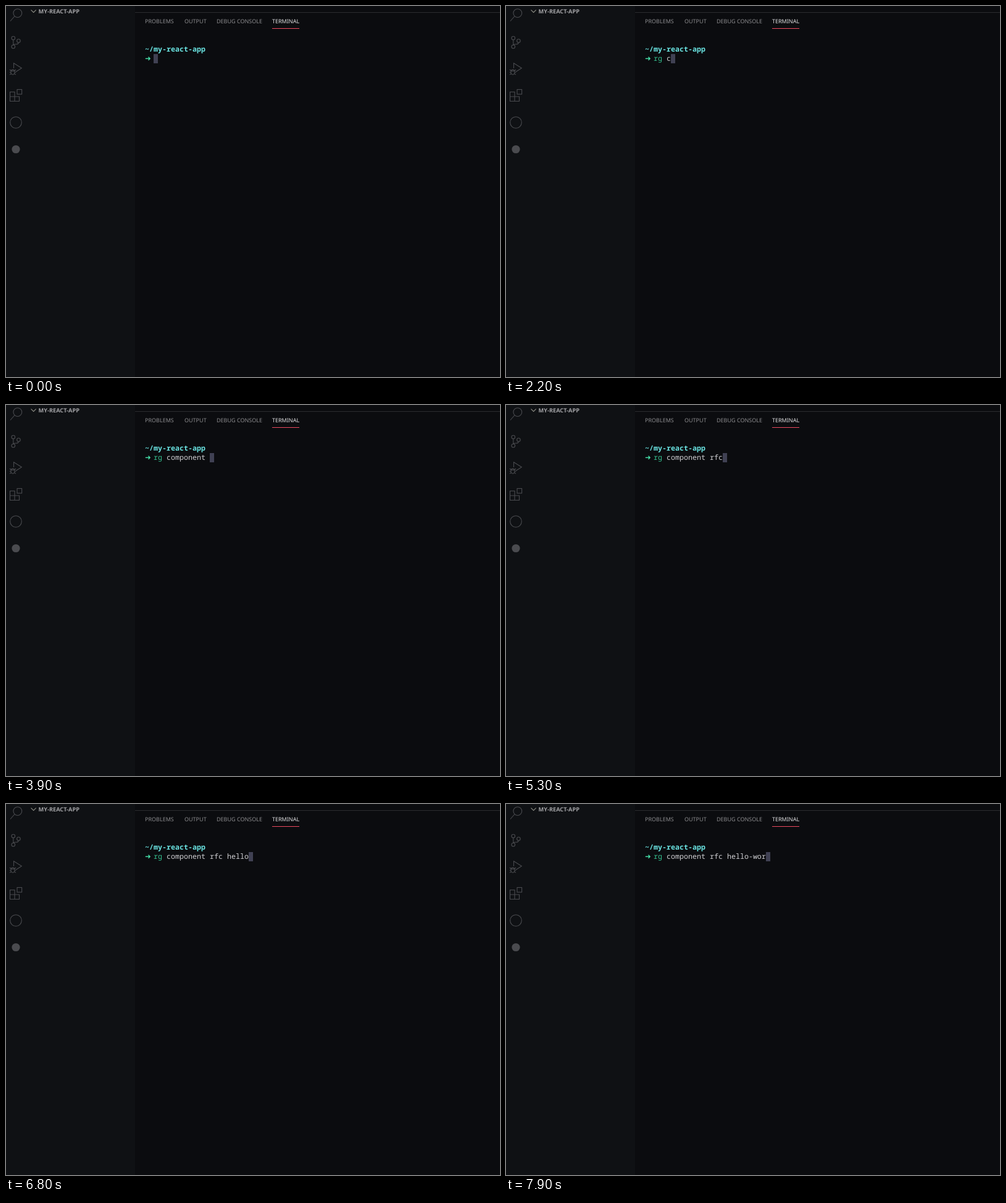
An HTML page for the animation above (8000 ms loop, 800x602 px).

```html
<!DOCTYPE html>
<html lang="en">
<head>
<meta charset="utf-8">
<title>Terminal typing</title>
<style>
  html, body { margin: 0; width: 100%; height: 100%; overflow: hidden; background: #0b0c0f; }
  svg { display: block; }
  text { text-rendering: geometricPrecision; white-space: pre; }
  .ui { font: 9px "Noto Sans", sans-serif; fill: #8c8c8f; }
  .ui .active { fill: #e2e2e4; }
  .title { font: bold 9.2px "Noto Sans", sans-serif; fill: #a3a3a6; }
  .term { font: 11.667px "Noto Sans Mono", monospace; fill: #cfcfd2; }
  .term .path { font-weight: bold; fill: #6be5e3; }
  .term .arrow { font-family: "DejaVu Sans", sans-serif; fill: #45e0a8; }
  .icons { fill: none; stroke: #4a4b4f; stroke-width: 1.1; }
  .icons .solid { fill: #4a4b4f; stroke: none; }
</style>
</head>
<body>
<svg width="800" height="602" viewBox="0 0 800 602">
  <rect width="800" height="602" fill="#0b0c0f"/>
  <rect width="209" height="602" fill="#0f1114"/>
  <rect x="209" y="10" width="591" height="1" fill="#2b2c2f"/>

  <g class="icons">
    <g id="search">
      <circle cx="18.8" cy="11.6" r="6.9"/>
      <path d="M14 16.5 7 24.5"/>
    </g>
    <g id="branch">
      <circle cx="11.8" cy="52" r="2.8"/>
      <circle cx="20.4" cy="56.5" r="2.8"/>
      <circle cx="11.8" cy="66" r="2.8"/>
      <path d="M11.8 55V63M20.4 59.3Q20 62 16 62T11.8 63"/>
    </g>
    <g id="debug">
      <path d="M12.5 101V92.8L25.3 100.8 16 106.8"/>
      <ellipse cx="11" cy="107.3" rx="3" ry="3.9"/>
      <path d="M8.3 105.5H13.7M6 103.2 8.3 105M16 103.2 13.7 105M5.8 107.5H8M14 107.5H16.2M6 111.4 8.3 109.8M16 111.4 13.7 109.8"/>
    </g>
    <g id="extensions">
      <path d="M6.5 139.5H14V154.5H6.5ZM6.5 147H21.5V154.5H14"/>
      <rect x="18" y="135.5" width="7.6" height="7.6"/>
    </g>
    <circle cx="16" cy="189" r="9.3"/>
    <circle class="solid" cx="16" cy="232.5" r="6.6"/>
  </g>

  <path d="M40.5 6.3 44.6 10.4 48.7 6.3" fill="none" stroke="#8f8f86" stroke-width="1.1"/>
  <text class="title" x="52.6" y="12">MY-REACT-APP</text>

  <g class="ui">
    <text x="225" y="28">PROBLEMS</text>
    <text x="289" y="28">OUTPUT</text>
    <text x="341" y="28">DEBUG CONSOLE</text>
    <text class="active" x="431" y="28">TERMINAL</text>
  </g>
  <rect x="431" y="36" width="44" height="1" fill="#ec4a60"/>

  <g class="term">
    <text class="path" x="225" y="74">~/my-react-app</text>
    <text class="arrow" x="225" y="89">➜</text>
    <text id="command" x="239" y="89"></text>
    <text id="args" x="260" y="89"></text>
  </g>
  <rect id="cursor" x="239" y="78" width="7" height="15" fill="#404153"/>
</svg>
<script>
  const LOOP = 8000, KEY = 100, CELL = 7, START = 239;

  // Start of each burst in ms; its keys follow one another every KEY ms.
  const bursts = [
    [900, "rg"], [1600, " "],
    [2200, "c"], [2400, "o"], [2700, "mpo"], [3200, "n"], [3500, "en"], [3600, "t"], [3900, " "],
    [4900, "rf"], [5300, "c"], [5500, " "],
    [6000, "he"], [6400, "ll"], [6800, "o"], [7200, "-"], [7600, "wo"], [7900, "r"]
  ];

  const [command, args, cursor] =
    ["command", "args", "cursor"].map(id => document.getElementById(id));

  function typedAt(time) {
    return bursts.map(([start, keys]) =>
      keys.slice(0, Math.max(0, Math.floor((time - start) / KEY) + 1))).join("");
  }

  function draw(time) {
    const line = typedAt(time);
    command.textContent = line.slice(0, 2);
    // The command turns valid once a space follows it.
    command.style.fill = line.length > 2 ? "#35c08f" : "#ec4a60";
    args.textContent = line.slice(3);
    cursor.setAttribute("x", START + CELL * line.length);
  }

  const origin = performance.now();
  function tick() {
    draw((performance.now() - origin) % LOOP);
    requestAnimationFrame(tick);
  }
  tick();
</script>
</body>
</html>
```
